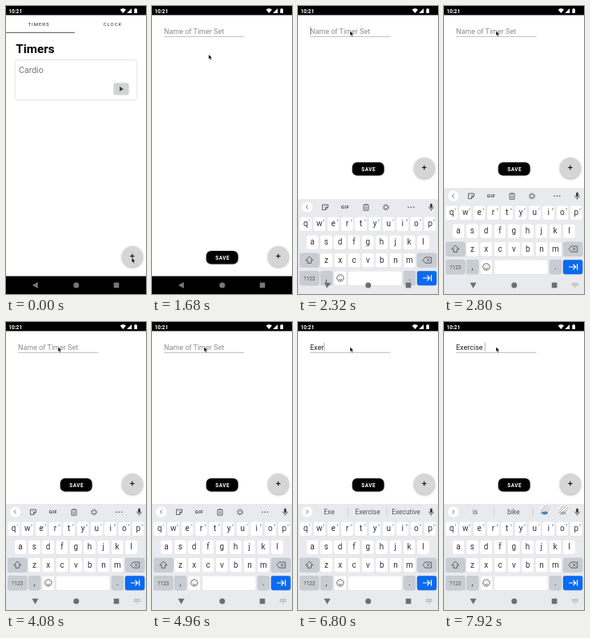
Recreate the animation shown at these times as an HTML page. Size 175 by 361 pixels, loop 8 s.

```html
<!DOCTYPE html>
<html lang="en">
<head>
<meta charset="utf-8">
<title>Timers</title>
<style>
html, body { margin: 0; width: 100%; height: 100%; overflow: hidden; background: #fff; }
svg { display: block; width: 100vw; height: 100vh; font-family: Roboto, sans-serif; }
text { white-space: pre; }
.mid { text-anchor: middle; }
.card { filter: drop-shadow(0 .6px 1px #0004); }
.lift { filter: drop-shadow(0 1.2px 1.4px #0005); }
.key { filter: drop-shadow(0 .6px 0 #b9bcc2); }
.line { fill: none; stroke: #555; stroke-width: .9; }
</style>
</head>
<body>
<svg viewBox="0 0 175 361" preserveAspectRatio="none">
  <rect width="175" height="361" fill="#fff"/>

  <g id="home">
    <g class="mid" font-size="6" letter-spacing="1">
      <text x="41" y="25" fill="#222">TIMERS</text>
      <text x="133.5" y="25" fill="#333">CLOCK</text>
    </g>
    <path d="M0 33.3H86" stroke="#4c5450" stroke-width="1"/>
    <text x="12.2" y="59" font-size="15.3" font-weight="700">Timers</text>
    <rect class="card" x="12" y="68" width="151" height="49" rx="2" fill="#fff"/>
    <text x="16" y="83.7" font-size="10.6" fill="#757575">Cardio</text>
    <rect class="card" x="135" y="97" width="18" height="14" rx="1" fill="#d0d3d2"/>
    <path d="M142 101v6l5-3z" fill="#444"/>
  </g>

  <g id="form">
    <text id="hint" x="15" y="34.6" font-size="9" fill="#8b8b8b">Name of Timer Set</text>
    <text id="value" x="15" y="34.6" font-size="9" fill="#222"></text>
    <path id="caret" d="M0 25.5V36.5" stroke="#888" stroke-width=".7"/>
    <path d="M15 38.3H115.5" stroke="#aaa" stroke-width=".8"/>
    <g id="save">
      <rect class="card" x="67.8" y="307" width="39.8" height="16.5" rx="6"/>
      <text class="mid" x="88.2" y="317.6" font-size="6.4" font-weight="700" letter-spacing=".5" fill="#fff">SAVE</text>
    </g>
  </g>

  <g id="fab">
    <circle class="lift" cx="158" cy="314" r="13" fill="#d6d6d6"/>
    <path d="M155 313.5h5.6M157.8 310.7v5.6" stroke="#111" stroke-width="1.2"/>
  </g>

  <rect id="bar" y="338.6" width="175" height="22.4"/>
  <g id="board">
    <rect y="228" width="175" height="133" fill="#e8eaee"/>
    <circle cx="11.5" cy="238" r="6.6" fill="#fff"/>
    <path id="chevron" class="line"/>
    <g id="tools">
      <path class="line" d="M30.5 235v6.5h4l3-3V235zM34.5 241.5v-3h3M32.6 237h.8M35 237h.8"/>
      <text class="mid" x="59" y="240.3" font-size="6" font-weight="700" letter-spacing=".4" fill="#444">GIF</text>
      <path class="line" d="M82 235.2h6v7h-6zM83.5 234.8h3M83.5 238h3M83.5 240h3"/>
      <circle class="line" cx="110" cy="238.3" r="2.4"/>
      <circle class="line" cx="110" cy="238.3" r="3.6" stroke-dasharray="1.4 1.43"/>
      <path d="M137.8 238.3h.1M141.2 238.3h.1M144.6 238.3h.1" stroke="#444" stroke-width="1.5" stroke-linecap="round"/>
    </g>
    <g id="words">
      <path d="M62.5 232.5v11M111 232.5v11" stroke="#c5c8cd" stroke-width=".8"/>
      <g id="list" class="mid" font-size="8.4" fill="#555"></g>
      <g id="faces"></g>
    </g>
    <rect x="165" y="233.6" width="3" height="5.6" rx="1.5" fill="#444"/>
    <path class="line" d="M163.6 237.6a2.9 2.9 0 0 0 5.8 0M166.5 240.5v2.2"/>
    <g id="keys"></g>
  </g>
  <g id="nav">
    <path id="back" d="M32.8 350l7-4v8z"/>
    <circle cx="87.8" cy="350" r="3.5"/>
    <rect x="134.7" y="346.7" width="6.6" height="6.6"/>
  </g>
  <path id="swap" d="M160.4 347.6h6.8v3h-6.8zM161.5 349.1h4.6M162.8 352.4l1 .9 1-.9" fill="none" stroke="#aaa" stroke-width=".8"/>

  <rect width="175" height="11.4"/>
  <text x="3.2" y="8.6" font-size="6.6" font-weight="600" fill="#fff">10:21</text>
  <path d="M142.6 4.6q3.7-3 7.4 0L146.3 9zM157.1 3v6h-6zM160.3 3.8h1v-.8h1.6v.8h1V9h-3.6z" fill="#fff"/>

  <path id="mouse" d="M0 0V6.2L1.4 4.9 2.5 7.4 3.7 6.9 2.6 4.5 4.5 4.4Z" stroke="#fff" stroke-width=".5"/>
</svg>

<script>
const LOOP = 8000, STEP = 80;
const $ = id => document.getElementById(id);
const show = (id, amount) => $(id).style.opacity = Number(amount);
const shift = (id, x, y) => $(id).setAttribute('transform', `translate(${x} ${y})`);

// Time and value tables
const PATH = [[1280, 157.2, 315.5], [1680, 70.8, 60.7], [1920, 65, 31.2]];
const RISE = [[2080, 133], [2160, 72], [2240, 35], [2320, 14], [2400, 4], [2480, 0]];
const TYPED = [[2240, ''], [5360, 'E'], [6080, 'Ex'], [6320, 'Exe'], [6640, 'Exer'], [6960, 'Exerc'],
  [7120, 'Exerci'], [7280, 'Exercis'], [7440, 'Exercise'], [7680, 'Exercise ']];
const WORDS = [[5440, 'E R W'], [6160, 'Ex Exercise Example'], [6480, 'Exe Exercise Executive'],
  [6880, 'Exercise Exercises Exercised'], [7760, 'is bike']];

const last = (table, t) => table.filter(row => row[0] <= t).pop() || [0, ''];

function along(table, t, ease = k => k) {
  const i = table.findIndex(row => row[0] > t);
  if (i < 0) return table[table.length - 1].slice(1);
  if (i === 0) return table[0].slice(1);
  const a = table[i - 1], b = table[i], k = ease((t - a[0]) / (b[0] - a[0]));
  return a.slice(1).map((v, n) => v + (b[n + 1] - v) * k);
}

// Keyboard
const GREY = '#c8ccd3';
const key = (x, y, w, fill = '#fff') =>
  `<rect class="key" x="${x}" y="${y - 8.8}" width="${w}" height="18" rx="2.4" fill="${fill}"/>`;
const label = (x, y, s, size = 10, fill = '#333') =>
  `<text class="mid" x="${x}" y="${y}" font-size="${size}" fill="${fill}">${s}</text>`;

function buildKeys() {
  let out = '';
  [['qwertyuiop', 9.5, 259], ['asdfghjkl', 18, 282], ['zxcvbnm', 35.5, 304.5]].forEach(([row, x0, y], r) => {
    [...row].forEach((c, i) => {
      const x = x0 + i * 17.3;
      out += key(x - 7.6, y, 15.2) + label(x, y + 3.1, c);
      if (!r) out += label(x + 5.2, y - 3.2, (i + 1) % 10, 4, '#666');
    });
  });
  out += key(2, 304.5, 24.5, GREY) + key(148.8, 304.5, 24.5, GREY)
    + key(2, 327, 24.5, GREY) + key(28, 327, 15.2, GREY) + key(45.3, 327, 15.2)
    + key(62.6, 327, 67.2) + key(131.8, 327, 15.2, GREY) + key(148.8, 327, 24.5, '#0b6af0')
    + label(14.2, 329.5, '?123', 6.6, '#555') + label(35.6, 330, ',') + label(139.4, 330, '.')
    + '<path class="line" d="M14.2 300l4.6 4.8h-2.4v3.6h-4.4v-3.6H9.6z"/>'
    + '<path class="line" d="M156 304.6l3-3.6h7.6v7.2H159zM161 302.9l3.4 3.4M164.4 302.9l-3.4 3.4"/>'
    + '<circle class="line" cx="52.9" cy="327" r="4.2"/>'
    + '<path class="line" d="M50.6 328.2q2.3 2.8 4.6 0M51.3 325.6h.6M53.9 325.6h.6"/>'
    + '<path d="M156 327h8.5M161.4 323.7l3.3 3.3-3.3 3.3M166.6 323.2v7.6" fill="none" stroke="#fff" stroke-width="1.2"/>';
  $('keys').innerHTML = out;

  $('faces').innerHTML = [[126, '#3f86c8'], [149, '#b9bbbd']].map(([x, c]) =>
    `<g transform="translate(${x} 236)"><circle r="6.8" fill="#f5f5f5"/>
     <ellipse cy="3.4" rx="4" ry="1.8" fill="${c}"/>
     <path d="M-6 1L1-6M-6 4L4-6M-4 6L6-4M-1 6L6-1" stroke="#777" stroke-width=".6"/></g>`).join('');
}

let text = null, words = null;

function draw(ms) {
  const t = Math.floor(ms / STEP) * STEP;
  const up = t >= 2160, rise = along(RISE, t)[0];

  show('home', t < 1040 ? 1 : t < 1120 ? .4 : 0);
  show('form', t < 1040 ? 0 : t < 1120 ? .6 : 1);
  shift('mouse', ...along(PATH, t, k => k * k * (3 - 2 * k)));
  shift('save', 0, up ? -111 : 0);
  shift('fab', 0, up ? -111 : 0);

  show('board', up);
  shift('board', 0, rise);
  $('bar').setAttribute('fill', up ? '#e8eaee' : '#000');
  $('nav').setAttribute('fill', up ? '#6c6e72' : '#777');
  const turn = up ? -90 * (1 - rise / 133) : 0;
  $('back').setAttribute('transform', `rotate(${turn} 36.5 350)`);
  show('swap', up && rise < 5);

  const [since, value] = last(TYPED, t);
  if (value !== text) {
    $('value').textContent = text = value;
    const w = value ? $('value').getComputedTextLength() : 0;
    shift('caret', 15.5 + w, 0);
  }
  show('hint', !value);
  show('caret', since > 0 && (t - since) % 1000 < 500);

  const line = last(WORDS, t)[1];
  if (line !== words) {
    words = line;
    $('list').innerHTML = line.split(' ').map((s, i) => `<text x="${39 + i * 48}" y="241">${s}</text>`).join('');
  }
  show('words', line !== '');
  show('tools', line === '');
  show('faces', t >= 7760);
  $('chevron').setAttribute('d', line ? 'M10.4 235.6l2.4 2.4-2.4 2.4' : 'M12.6 235.6l-2.4 2.4 2.4 2.4');
}

buildKeys();
draw(0);
const start = performance.now();
(function tick() {
  draw((performance.now() - start) % LOOP);
  requestAnimationFrame(tick);
})();
</script>
</body>
</html>
```
